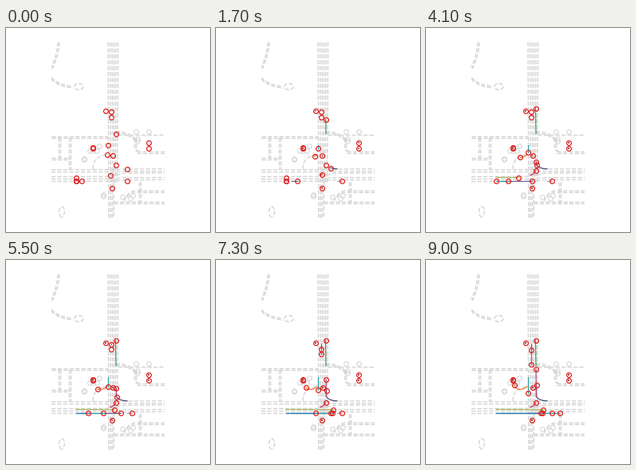
Recreate the animation shown at these times as a matplotlib script. Size 256x256 px, loop 9100 ms.

```python
import numpy as np
import matplotlib.pyplot as plt
from matplotlib.animation import FuncAnimation
from matplotlib.patches import Rectangle

SIZE, DPI, STEPS = 256, 64, 91
PX = 72 / DPI  # one pixel in points
rng = np.random.default_rng(4)
times = np.arange(STEPS) / 10

fig = plt.figure(figsize=(SIZE / DPI, SIZE / DPI), dpi=DPI, facecolor="white")
ax = fig.add_axes([0, 0, 1, 1])
ax.set(xlim=(0, SIZE), ylim=(SIZE, 0))
ax.axis("off")
window = Rectangle((57, 18), 142, 220, transform=ax.transData)


def bezier(pts, u):
    """Bezier curve of any degree by repeated blending."""
    pts = [np.asarray(p, float) for p in pts]
    u = np.asarray(u)[:, None]
    while len(pts) > 1:
        pts = [a + (b - a) * u for a, b in zip(pts, pts[1:])]
    return pts[0]


def lane(*pts, gap=(0, 0)):
    """A dashed line, and its parallel partner when a gap is given."""
    for k in range(2 if any(gap) else 1):
        xy = np.array(pts, float) + k * np.array(gap)
        line, = ax.plot(*xy.T, color="lightgray", lw=1.4 * PX, ls="--", zorder=1)
        line.set_clip_path(window)


def bend(*pts, gap=(0, 0)):
    lane(*bezier(pts, np.linspace(0, 1, 20)), gap=gap)


def loop(x, y, rx, ry):
    a = np.linspace(0, 2 * np.pi, 30)
    lane(*zip(x - rx * np.cos(a), y - ry * np.sin(a)))


def linear(s):
    return s


def smooth(s):
    return s * s * (3 - 2 * s)


def speed_up(s):
    return s ** 1.45


def slow_down(s):
    return 1 - (1 - s) ** 1.25


def move(start, end, *pts, ease=linear):
    return bezier(pts, ease(np.clip((times - start) / (end - start), 0, 1)))


def park(x, y):
    return np.array([x, y]) + rng.normal(0, 0.018, (STEPS, 2)).cumsum(axis=0)


# north-south road
for i in range(3):
    lane((128 + 2.5 * i, 18), (128.5 + 2.5 * i, 130), (128.8 + 2.2 * i, 238))
    lane((135.3 + 2.6 * i, 18), (135.3 + 2.4 * i, 130), (135.3 + 2 * i, 194))
lane((135.4, 194), (135.2, 238))

# east-west road
for left, right in ((178, 176.8), (180.8, 179.6), (186.6, 181.8), (189.6, 187.6), (192.6, 190.4)):
    lane((57, left), (128, left - 0.3), (150, right + 0.3), (199, right))

# western side streets
lane((57, 136), (128, 136), gap=(0, 2.2))
lane((57, 163), (80, 163), gap=(0, 2.2))
lane((66, 137), (66, 163), gap=(2.2, 0))
lane((79, 137), (79, 177), gap=(2.2, 0))
bend((109, 177), (109, 160), (128, 159))

# eastern side streets
lane((140, 134), (199, 134))
bend((138, 130), (154, 130), (162, 139), gap=(0, 2.2))
lane((161.5, 138), (161.5, 150), (164, 155), gap=(2, 0))
lane((164, 155), (199, 155), gap=(0, 2.2))
lane((167, 193), (167, 219), gap=(2.2, 0))
lane((135, 218), (199, 218), gap=(0, 2.2))
lane((199, 204), (162, 204), gap=(0, 2.2))
bend((162, 204), (154, 206), (148, 215), gap=(0, 2.2))

# curved street and turning loops
bend((67, 18), (66, 36), (57, 53), gap=(-2, 0))
bend((57, 62), (66, 72), (84, 73), gap=(0, 2))
loop(91.5, 73.5, 5.5, 4)
bend((69, 238), (60, 220), (80, 220), (71, 238))

rows = [((163, 129.5), (179, 129.5), 2), ((165, 139), (165, 141.5), 2),
        ((117, 148), (117, 148), 1), ((98, 163.5), (98, 165), 2),
        ((105, 154), (113.5, 154), 3), ((122, 209), (122, 211), 2),
        ((146, 212), (155.5, 213.5), 2), ((159, 210), (159, 210), 1)]
idle = np.vstack([np.linspace(a, b, n) for a, b, n in rows])
ax.plot(*idle.T, ls="none", marker="o", ms=5.6 * PX, mfc="none",
        mec="lightgray", mew=PX, zorder=2)

# the right turner waits at the corner before following the car ahead
turn = move(0, 4.3, (152, 176.8), (142, 176.5), (138.5, 171.6), ease=slow_down)
follow = move(5.5, 9, (0, 0), (0, -14.5))

tracks = [
    (move(0, 3.1, (138, 132.5), (137.5, 100.5)), "#2e9650"),
    (move(5.8, 9, (131.5, 112), (131.5, 131), ease=speed_up), "#a06a6a"),
    (move(5, 7.9, (131.5, 105), (131.5, 113), ease=smooth), "#8a5a50"),
    (move(0, 9, (128, 147), (128, 167)), "#22a0a0"),
    (move(0, 9, (127, 158.5), (122, 164), (112, 164), (111.3, 156.7)), "#f07830"),
    (turn + follow, "#464678"),
    (move(2.8, 9, (138.4, 171.6), (138, 136.8), ease=speed_up), "#b44678"),
    (move(0, 4.1, (131, 184.5), (135.5, 183.5), (137.7, 179), ease=speed_up), "#c82850"),
    (move(2.05, 6.3, (88, 187.5), (147, 187.8)), "#aab45a"),
    (move(0, 1.5, (152, 192.3), (158, 192.3)), "#b0a0a0"),
    (move(0.5, 5.7, (95, 192.3), (144, 192.3), ease=smooth), "#6e6496"),
    (move(2.95, 9, (88, 192.3), (168, 192.3)), "#28a0a0"),
    (move(4.3, 9, (88, 192.3), (145.5, 192.3)), "#2878b4"),
]
tracks += [(park(x, y), "#a04646") for x, y in (
    (125, 103.7), (133.5, 160), (133.3, 201), (179.2, 143.7), (179.2, 151.3),
    (109, 150.3), (109, 151))]

trails = [ax.plot([], [], color=c, lw=1.2 * PX, zorder=3)[0] for _, c in tracks]
cars, = ax.plot([], [], ls="none", marker="o", ms=5.8 * PX, mfc="none",
                mec="#e01818", mew=1.2 * PX, zorder=4)


def update(i):
    for line, (path, _) in zip(trails, tracks):
        line.set_data(path[:i + 1, 0], path[:i + 1, 1])
    now = np.array([path[i] for path, _ in tracks])
    cars.set_data(now[:, 0], now[:, 1])
    return [*trails, cars]


anim = FuncAnimation(fig, update, frames=STEPS, interval=100, repeat=True, repeat_delay=0)
plt.show()
```
